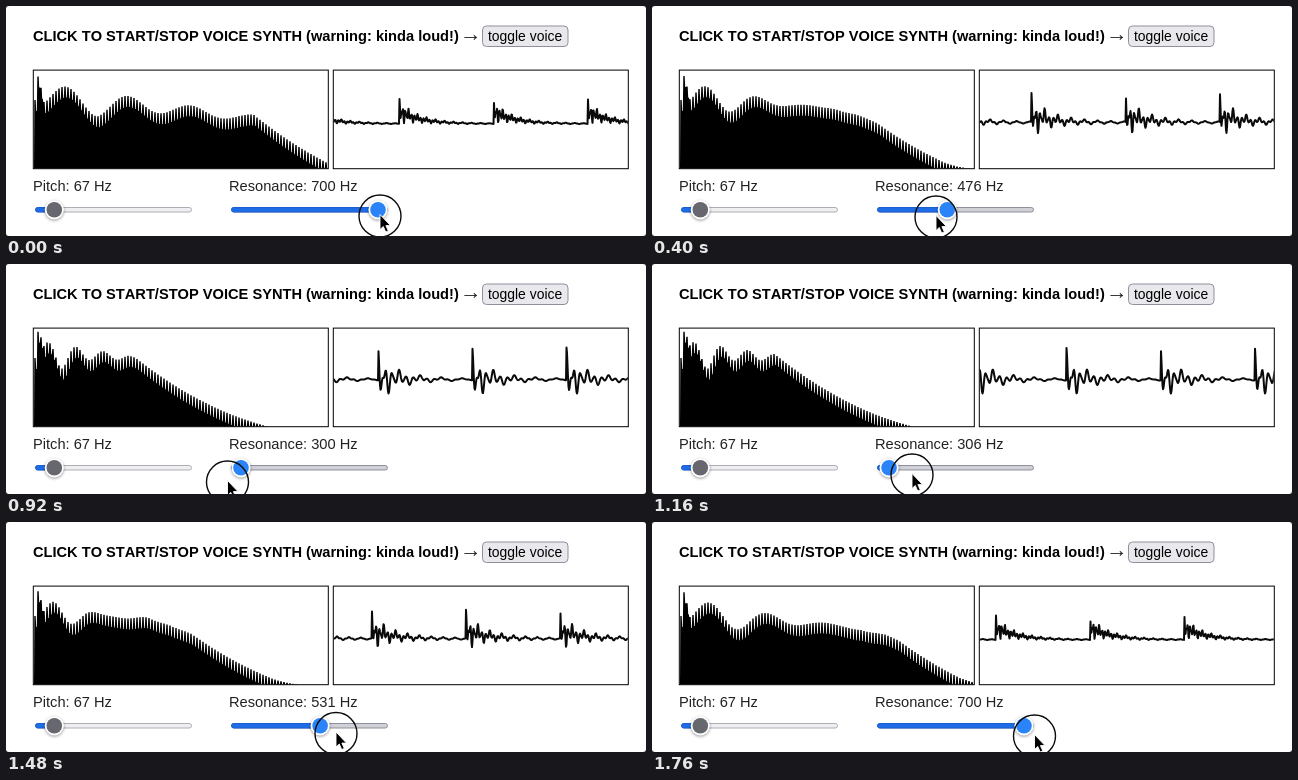
Write an HTML page that moves like this. It is 640 px wide and 230 px high and loops after 1.8 s.

```html
<!DOCTYPE html>
<html lang="en">
<head>
<meta charset="utf-8">
<title>Voice synth</title>
<style>
  html, body { margin: 0; width: 100%; height: 100%; overflow: hidden; background: #222; }
  svg { display: block; width: 640px; height: 230px; background: #fff; border-radius: 3px; }
  text { font: 14.65px "Liberation Sans", Arial, sans-serif; fill: #222; white-space: pre; }
  .title { font-size: 14.63px; font-weight: bold; font-kerning: none; fill: #000; }
  .arrow { font-size: 21.5px; }
  .button { font-size: 13.9px; fill: #000; }
  .frame { fill: none; stroke: #000; }
  .track { fill: #efeff2; stroke: #adadb5; }
  .track.hover { fill: #d0d0d7; stroke: #8f8f9d; }
  .fill { fill: #1f6de6; stroke: #1a60d2; }
  .ring { fill: #fff; filter: drop-shadow(0 1px 1.5px rgba(0, 0, 0, .4)); }
  #wave { fill: none; stroke: #0a0a0a; stroke-width: 2; stroke-linejoin: round; }
</style>
</head>
<body>
<svg viewBox="0 0 640 230">
  <defs>
    <clipPath id="scope"><rect x="327.8" y="65" width="294" height="97"/></clipPath>
  </defs>

  <text class="title" x="27" y="35">CLICK TO START/STOP VOICE SYNTH (warning: kinda loud!)</text>
  <text class="arrow" x="454" y="35">→</text>
  <rect x="476.5" y="20" width="85.5" height="20.5" rx="4" fill="#e9e9ed" stroke="#8f8f9d"/>
  <text class="button" x="482" y="35">toggle voice</text>

  <path id="spectrum"/>
  <g clip-path="url(#scope)"><path id="wave"/></g>
  <rect class="frame" x="27.3" y="64.1" width="295" height="98.6"/>
  <rect class="frame" x="327.3" y="64.1" width="295" height="98.6"/>

  <text x="27" y="185">Pitch: 67 Hz</text>
  <rect class="track" x="29.5" y="201.5" width="156" height="4.5" rx="2.25"/>
  <rect class="fill" x="29.5" y="201.5" width="18.5" height="4.5" rx="2.25"/>
  <circle class="ring" cx="48.3" cy="203.8" r="9.6"/>
  <circle cx="48.3" cy="203.8" r="7.8" fill="#67676f"/>

  <text id="label" x="223" y="185"></text>
  <rect class="track hover" x="225.5" y="201.5" width="156" height="4.5" rx="2.25"/>
  <rect class="fill" id="fill" x="225.5" y="201.5" height="4.5" rx="2.25"/>
  <g id="thumb">
    <circle class="ring" cy="203.8" r="9.6"/>
    <circle cy="203.8" r="7.8" fill="#2a83f7"/>
  </g>

  <g id="pointer">
    <circle r="21" fill="none" stroke="#0a0a0a" stroke-width="1.4"/>
    <path d="M0-1.5V13.5L3.3 10.5 5.7 16 8.3 14.9 5.9 9.6H10.5Z" fill="#000" stroke="#fff" stroke-width=".9"/>
  </g>
</svg>

<script>
const LOOP = 1800, STEP = 40;
const LEFT = 28, FLOOR = 162.5;
const PX_PER_HZ = 0.0447;
const PERIOD = 94.2;

const $ = id => document.getElementById(id);

// Monotone cubic through the given points, flat at both ends.
function curve(xs, ys) {
  const last = xs.length - 1;
  const slope = xs.map((_, i) => {
    if (i === 0 || i === last) return 0;
    const a = (ys[i] - ys[i - 1]) / (xs[i] - xs[i - 1]);
    const b = (ys[i + 1] - ys[i]) / (xs[i + 1] - xs[i]);
    return a * b <= 0 ? 0 : 2 * a * b / (a + b);
  });
  return x => {
    if (x <= xs[0]) return ys[0];
    if (x >= xs[last]) return ys[last];
    let i = 0;
    while (x > xs[i + 1]) i++;
    const w = xs[i + 1] - xs[i], u = (x - xs[i]) / w, v = 1 - u;
    return ys[i] * v * v * (1 + 2 * u) + ys[i + 1] * u * u * (3 - 2 * u)
      + w * u * v * (slope[i] * v - slope[i + 1] * u);
  };
}

const times = [0, 400, 680, 920, 1160, 1480, 1760];
const mouseX = curve(times, [374, 284, 241.5, 221.5, 260, 330, 382.5]);
const mouseY = curve(times, [210, 211, 214, 218, 211, 211.5, 214]);
const pulseX = curve(times, [393.5, 662, 832.5, 1031.5, 1168, 1402, 1568.5]);
const resonance = curve(
  [0, 400, 680, 790, 1140, 1160, 1480, 1740],
  [700, 476, 333, 300, 300, 306, 531, 700]);

// Outline with formants at 1, 3, 5 and 7 times the resonance, then a falling tail.
function formants(x, hz) {
  const dist = x - LEFT;
  const unit = hz * PX_PER_HZ;
  const u = Math.min(dist / unit, 7);
  const dip = 50 / Math.max(u, 2) * (1 + Math.cos(Math.PI * u)) / 2;
  const over = Math.min(Math.max(dist - 7 * unit, 0), 180);
  const tail = 0.8 * over - 0.002 * over * over;
  const fundamental = 32 * Math.exp(-(((x - 32) / 3) ** 2));
  return Math.min(FLOOR, 76 + 0.15 * u * unit + dip + tail - fundamental);
}

// The analyser smooths over time, so recent resonances are averaged.
function spectrumPath(t) {
  const recent = [40, 130, 220].map(lag => resonance(t - lag));
  const top = x => recent.reduce((sum, hz) => sum + formants(x, hz), 0) / recent.length;
  let d = `M${LEFT} ${FLOOR}`;
  // One tooth per harmonic.
  for (let x = LEFT + 0.3; x < 320; x += 3) {
    const tip = top(x), gap = Math.min(FLOOR, tip + 11);
    d += `L${x} ${tip}h1.4L${x + 1.9} ${gap}h.6`;
  }
  return d + `V${FLOOR}Z`;
}

// Ringing of a tube closed at one end: [multiple, amplitude, decay].
const partials = [[1, 5, 55], [3, 14, 22], [5, 12, 8]];

function ring(dist, hz) {
  const k = (hz - 300) / 400;
  const gain = 1 - 0.58 * k;
  const length = PERIOD * 67 / hz;
  let sum = (2 + 10 * k) * Math.exp(-dist / 22);
  for (const [n, amp, decay] of partials) {
    sum += gain * amp * Math.exp(-dist / decay) * Math.cos(2 * Math.PI * n * dist / length);
  }
  return sum;
}

function wavePath(t, hz) {
  const base = 115.5 + 2.3 * (hz - 300) / 400;
  const start = pulseX(t);
  let d = "";
  for (let x = 327; x <= 623; x += 0.5) {
    const dist = ((x - start) % PERIOD + PERIOD) % PERIOD;
    const y = base - ring(dist, hz) - ring(dist + PERIOD, hz);
    d += `${d ? "L" : "M"}${x} ${y.toFixed(2)}`;
  }
  return d;
}

function draw(t) {
  const hz = resonance(t);
  const thumbX = 235 + (hz - 300) / 400 * 137;
  $("spectrum").setAttribute("d", spectrumPath(t));
  $("wave").setAttribute("d", wavePath(t, hz));
  $("label").textContent = `Resonance: ${Math.round(hz)} Hz`;
  $("fill").setAttribute("width", thumbX - 225.5);
  $("thumb").setAttribute("transform", `translate(${thumbX} 0)`);
  $("pointer").setAttribute("transform", `translate(${mouseX(t)} ${mouseY(t)})`);
}

const begin = performance.now();
let shown = -1;

function tick() {
  const t = Math.floor((performance.now() - begin) % LOOP / STEP) * STEP;
  if (t !== shown) draw(shown = t);
  requestAnimationFrame(tick);
}
tick();
</script>
</body>
</html>
```
